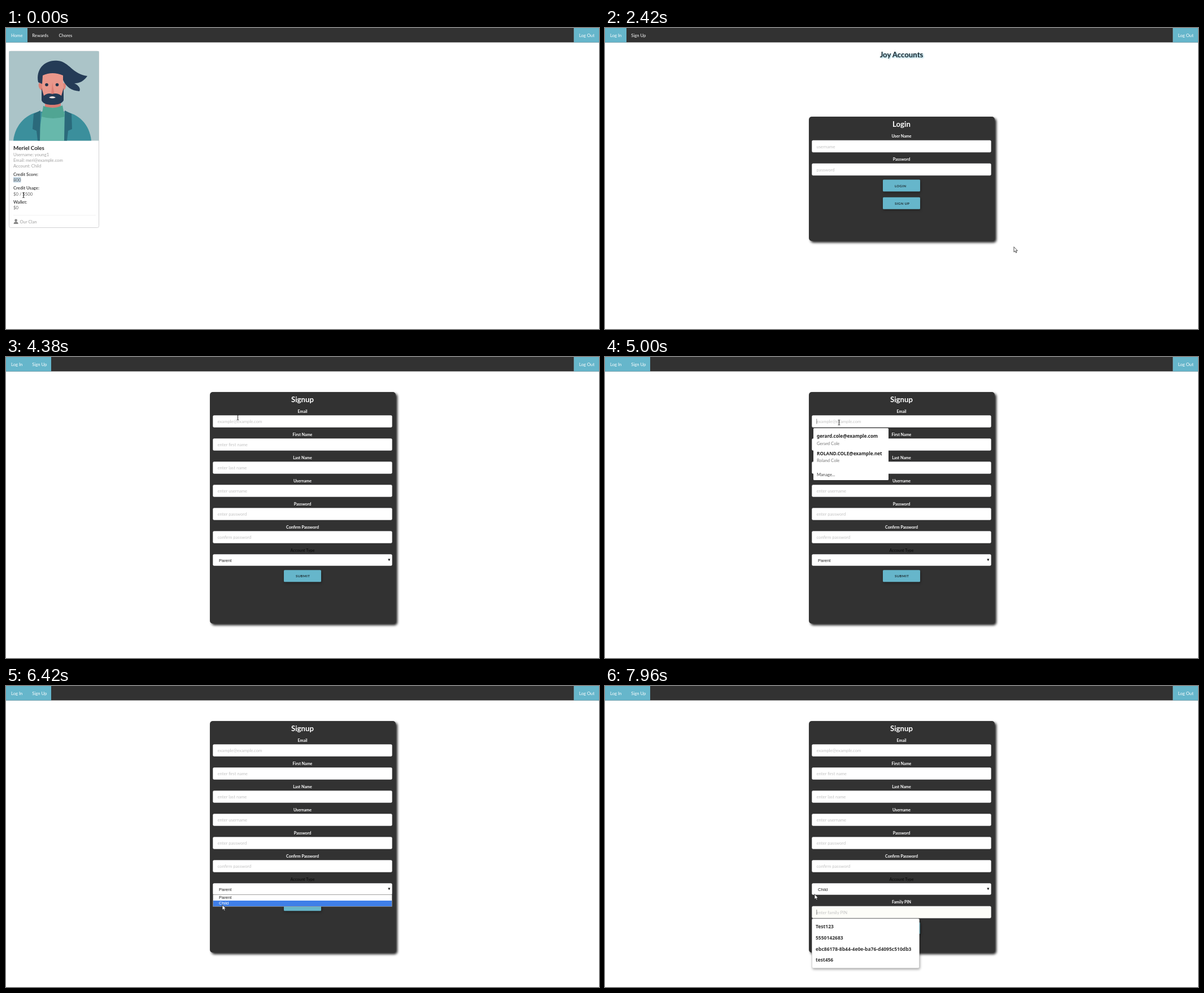
These frames come from a looping animation (1050x533 px, 8 s). An HTML page:

```html
<!DOCTYPE html>
<html lang="en">
<head>
<meta charset="utf-8">
<title>Family budget demo</title>
<style>
  html, body { margin: 0; width: 100%; height: 100%; overflow: hidden; background: #fff; }
  svg { display: block; width: 100%; height: 100%; font-family: Lato, sans-serif; font-size: 7.7px; }
  text { white-space: pre; }
  .b { font-weight: bold; }
  .mid { text-anchor: middle; }
  .label { font-weight: bold; font-size: 7.15px; text-anchor: middle; }
  .btn { font-weight: bold; font-size: 6px; letter-spacing: .4px; }
  .arial { font-family: "Liberation Sans", Arial, sans-serif; font-size: 7.6px; }
  .list { font-family: "Noto Sans", sans-serif; font-weight: bold; font-size: 8.5px; }
  .panel { filter: drop-shadow(3px 3px 2px #222); }
  .soft { filter: drop-shadow(1px 2px 2px rgba(0,0,0,.35)); }
  .title { text-shadow: 1px 1px 3px #64b5cb; }
</style>
</head>
<body>
<svg id="stage" viewBox="0 0 1050 533"></svg>
<script>
const ACCENT = '#66b6cb', DARK = '#323232';

const text = (x, y, s, fill = '#fff', cls = '', size) =>
  `<text x="${x}" y="${y}" fill="${fill}" class="${cls}"${size ? ` style="font-size:${size}px"` : ''}>${s}</text>`;
const rect = (x, y, w, h, fill, more = '') =>
  `<rect x="${x}" y="${y}" width="${w}" height="${h}" fill="${fill}" ${more}/>`;
const path = (d, fill, more = '') => `<path d="${d}" fill="${fill}" ${more}/>`;
const group = (id, body) => `<g id="${id}">${body}</g>`;

const heading = (y, s) => text(525, y, s, '#fff', 'b mid', 13.2);
const label = (y, s, fill) => text(525, y, s, fill, 'label');
const panel = (y, h) => rect(361, y, 329, h, DARK, 'rx="5" class="panel"');
const box = (y, h = 21, fill = '#fff') =>
  rect(366.5, y, 317, h, fill, 'rx="2" stroke="#d8d8da" stroke-width=".6"');
const field = (y, name, hint, fill) =>
  label(y - 5, name) + box(y, 21, fill) + text(374.5, y + 13.5, hint, '#c3c3c3');
const button = (y, s) =>
  rect(492, y, 66, 21, ACCENT, 'rx="1.5" class="soft"') + text(513, y + 13, s, '#1d2b30', 'btn');
const caret = y => rect(374.6, y, .6, 9, '#333');

const avatar =
  rect(5.5, 41, 159, 158.5, '#abc4c8') +
  path('M13 199.5C16 170 38 150 62 148H104C128 152 148 170 151 199.5Z', '#3b8f9c') +
  path('M64 149 105 149 108 199.5H57Z', '#67b8ab') +
  path('M49 152 61 146 60 199.5H56L54 182 47 179ZM104 146 116 152 117 179 110 182 108 199.5H103Z', '#2b6a7b') +
  path('M69 128H97V141H69Z', '#d87b72') +
  path('M66 138Q83 145 100 137L104 157Q83 163 63 157Z', '#50a593') +
  path('M64 96C57 93 55 104 62 110H66ZM101 98C107 95 108 107 102 110Z', '#dc8479') +
  path('M64 78H101L102 124Q82 134 64 124Z', '#e9978b') +
  path('M82 96 80 118H86Z', '#de7f76') +
  path('M57 96C52 72 70 55 92 58C112 60 118 82 144 85C138 94 130 98 121 98C128 101 133 107 130 112C116 111 106 104 101 92V84Q82 76 65 84L64 99Z', '#243b56') +
  path('M63 106 67 120Q74 114 82 117Q91 114 98 120L102 106V128Q98 136 82 136Q66 136 63 128Z', '#243b56') +
  path('M76 123Q82 119 88 123Q82 126 76 123Z', '#f4e6e2') +
  '<circle cx="72" cy="100.5" r="2.8" fill="#22354c"/><circle cx="90.5" cy="100.5" r="2.8" fill="#22354c"/>';

const home =
  rect(5.5, 41, 159, 312.5, '#fff', 'rx="3" stroke="#d2d2d4" class="card"') + avatar +
  text(13, 215.5, 'Meriel Coles', '#2a2a2a', 'b', 9.9) +
  text(13, 226.5, 'Username: young1', '#a0a0a0') +
  text(13, 237, 'Email: meri@example.com', '#a0a0a0') +
  text(13, 247.3, 'Account: Child', '#a0a0a0') +
  rect(13, 264, 13.5, 9.5, '#c4d8e6') +
  [['Credit Score:', '800', 261.5], ['Credit Usage:', '$0 / $500', 286.2], ['Wallet:', '$0', 310.8]]
    .map(([k, v, y]) => text(13, y, k, '#4a4a4a', 'b') + text(13, y + 10.4, v, '#666')).join('') +
  rect(13, 331, 146, .7, '#ececec') +
  '<circle cx="17.6" cy="340.6" r="2.3" fill="#888"/>' +
  path('M13.6 347Q13.6 343 17.6 343T21.6 347Z', '#888') +
  text(24.5, 345.6, 'Our Clan', '#a0a0a0');

const login =
  text(525, 51.7, 'Joy Accounts', '#1f2b33', 'b mid title', 13.2) +
  panel(157, 220) + heading(175.3, 'Login') +
  field(199, 'User Name', 'username') + field(240, 'Password', 'password') +
  button(268.5, 'LOGIN') + button(299.8, 'SIGN UP');

const hints = [
  ['Email', 'example@example.com'], ['First Name', 'enter first name'], ['Last Name', 'enter last name'],
  ['Username', 'enter username'], ['Password', 'enter password'], ['Confirm Password', 'confirm password']];

const option = (id, y, s) =>
  group(id, rect(367, y, 316, 10, '#fff') + text(377, y + 7.3, s, '#222', 'arial'));

const signup =
  panel(62, 410) + heading(79.7, 'Signup') +
  hints.map(([n, h], i) => field(103.5 + 41 * i, n, h)).join('') +
  label(344.7, 'Account Type', '#111') + box(349.5, 20) +
  '<text id="choice" x="377" y="362.6" fill="#222" class="arial"></text>' +
  path('M676.4 357.5H680.4L678.4 361.5Z', '#111') +
  group('submit', button(377.3, 'SUBMIT')) +
  group('pin', field(390, 'Family PIN', 'enter family PIN', '#fdfdf8')) +
  group('pinList', caret(396) +
    rect(366.5, 412, 190, 87.5, '#fff', 'rx="2" stroke="#c8c8c8" stroke-width=".7" class="soft"') +
    ['Test123', '5550142683', 'ebc86178-8b44-4e0e-ba76-d4095c510db3', 'test456']
      .map((s, i) => text(373, 429.2 + 19.7 * i, s, '#333', 'list')).join('')) +
  group('mailList', caret(109.5) + rect(369, 126, 133, 92, '#fff', 'rx="1.5"') +
    text(375, 143, 'gerard.cole@example.com', '#222', 'list', 8.2) +
    text(375, 155.5, 'Gerard Cole', '#777') +
    text(375, 173.5, 'ROLAND.COLE@example.net', '#222', 'list', 8.2) +
    text(375, 186, 'Roland Cole', '#777') +
    text(375, 210.5, 'Manage...', '#444')) +
  group('menu', rect(366.5, 369.5, 317, 21, '#fff', 'stroke="#777" stroke-width=".6"') +
    option('optParent', 370, 'Parent') + option('optChild', 380, 'Child'));

const nav = rect(0, 0, 1050, 25.5, DARK) + rect(0, 0, 38, 25.5, ACCENT) +
  rect(1006, 0, 44, 25.5, ACCENT) + rect(1005.5, 0, .7, 25.5, '#8ccbdb') + text(1014.8, 15.5, 'Log Out');
const homeNav = text(9, 15.5, 'Home') + text(46.3, 15.5, 'Rewards') + text(93.5, 15.5, 'Chores');
const guestNav = group('signTab', rect(38, 0, 42, 25.5, ACCENT)) +
  text(9, 15.5, 'Log In') + text(46.3, 15.5, 'Sign Up');

const pointer = group('cursor',
  path('M0 0V9.2L2.1 7.3 3.6 10.6 5.1 9.9 3.7 6.8H6.4Z', '#fff', 'id="arrow" stroke="#222" stroke-width=".8"') +
  path('M-1.7-4.5Q0-4.5 0-3.5Q0-4.5 1.7-4.5M0-3.5V3.5M-1.7 4.5Q0 4.5 0 3.5Q0 4.5 1.7 4.5', 'none',
    'id="beam" stroke="#222" stroke-width="1"'));

document.getElementById('stage').innerHTML = nav + group('homeNav', homeNav) + group('guestNav', guestNav) +
  group('home', home) + group('login', login) + group('signup', signup) + pointer;

const el = Object.fromEntries([...document.querySelectorAll('[id]')].map(e => [e.id, e]));
const show = (id, on) => el[id].style.display = on ? '' : 'none';
const between = (v, a, b) => v >= a && v < b;

// Pointer stops: time, x, y
const stops = [
  [0, 31, 296], [40, 31, 296], [330, 1028, 10], [430, 1028, 10], [750, 408, 470.5], [1740, 408, 470.5],
  [2340, 724, 387.5], [2560, 724, 387.5], [2920, 527, 309], [3500, 527, 309], [4250, 410.5, 107],
  [4950, 410.5, 107], [5400, 521, 358.5], [5850, 521, 358.5], [6300, 383, 387.5], [6640, 383, 387.5],
  [6900, 398, 401], [7150, 398, 401], [7450, 400, 446], [7540, 400, 446], [7880, 371, 368.5], [8000, 371, 368.5]];

function pointerAt(t) {
  const i = stops.findIndex(s => s[0] > t), a = stops[i - 1], b = stops[i];
  const p = (t - a[0]) / (b[0] - a[0]), k = p * p * (3 - 2 * p);
  return [a[1] + (b[1] - a[1]) * k, a[2] + (b[2] - a[2]) * k];
}

function overText(page, child, x, y) {
  if (page === 'home') return x < 60 && between(y, 205, 350);
  if (!between(x, 366, 684)) return false;
  const rows = page === 'login' ? [199, 240] : [...hints.map((_, i) => 103.5 + 41 * i), ...(child ? [390] : [])];
  return rows.some(r => between(y, r, r + 21));
}

function draw(t) {
  const page = t < 400 ? 'home' : t < 3040 ? 'login' : 'signup';
  const child = t >= 6560;
  const onChild = t >= 6200;
  ['home', 'login', 'signup'].forEach(p => show(p, p === page));
  show('homeNav', page === 'home');
  show('guestNav', page !== 'home');
  show('signTab', page === 'signup');

  show('mailList', between(t, 4560, 5630));
  el.mailList.style.opacity = Math.min(1, (5630 - t) / 200);
  show('menu', between(t, 5480, 6560));
  [['optParent', !onChild], ['optChild', onChild]].forEach(([id, on]) => {
    el[id].firstChild.setAttribute('fill', on ? '#3f7fe8' : '#fff');
    el[id].lastChild.setAttribute('fill', on ? '#fff' : '#222');
  });
  el.choice.textContent = child ? 'Child' : 'Parent';
  show('pin', child);
  show('pinList', t >= 7060);
  el.submit.setAttribute('transform', `translate(0 ${child ? 41 : 0})`);

  const [x, y] = pointerAt(t), beam = overText(page, child, x, y);
  el.cursor.setAttribute('transform', `translate(${x} ${y})`);
  show('beam', beam);
  show('arrow', !beam);
}

const start = performance.now();
function tick() {
  draw((performance.now() - start) % 8000);
  requestAnimationFrame(tick);
}
tick();
</script>
</body>
</html>
```
